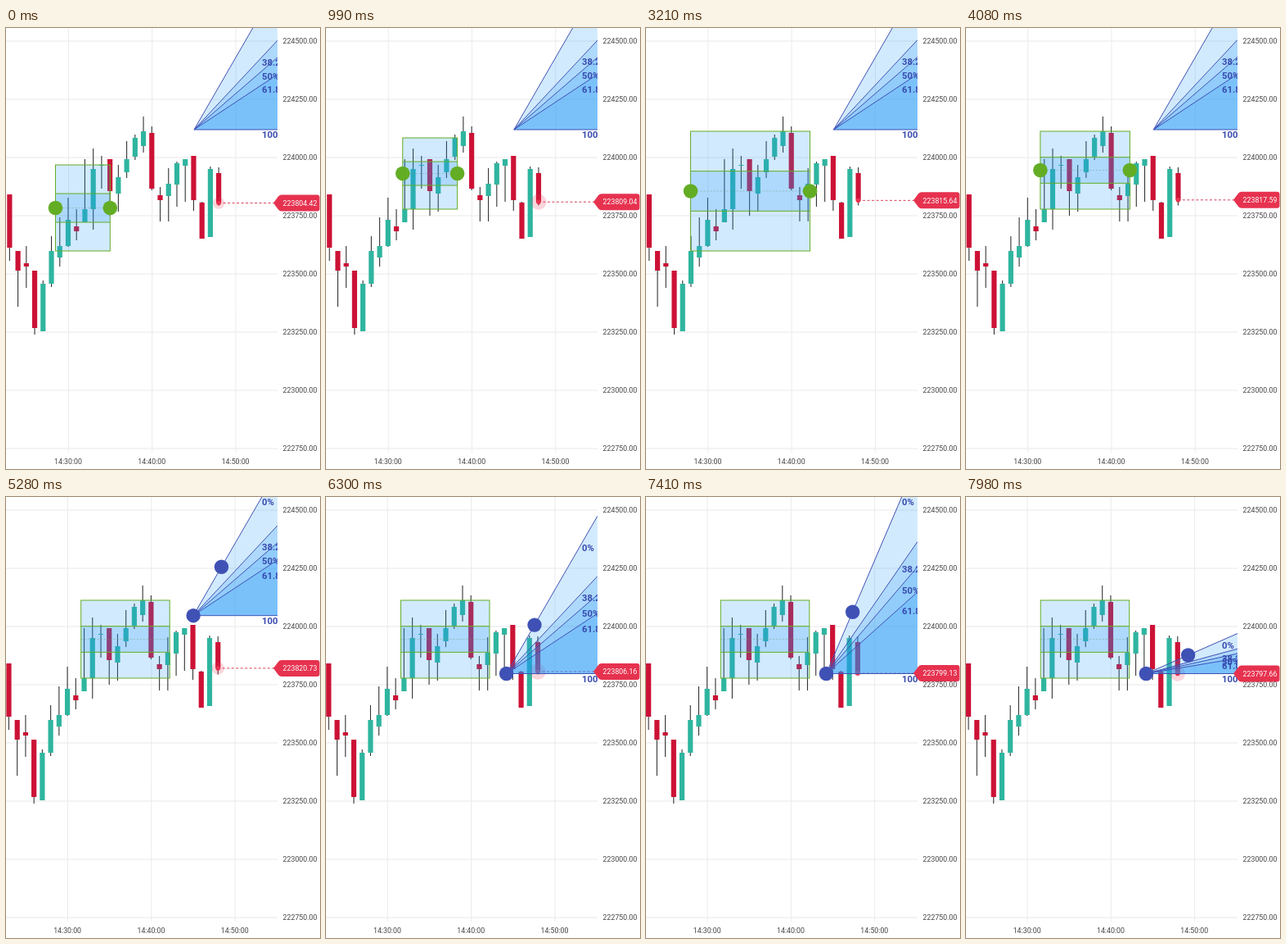
These frames come from a looping animation (384 by 538 pixels, 8000 ms). An HTML page with a canvas:

```html
<!DOCTYPE html>
<html lang="en">
<head>
<meta charset="utf-8">
<title>Candlestick chart with drawing tools</title>
<style>
  html, body { margin: 0; width: 100%; height: 100%; overflow: hidden; background: #fff; }
  canvas { display: block; width: 384px; height: 538px; }
</style>
</head>
<body>
<canvas id="chart"></canvas>
<script>
const W = 384, H = 538, LOOP = 8000, PLOT = 332;
const MINUTE = 10.23, ORIGIN = 76;
const RED = '#cc1236', GREEN = '#2fb59f', PRICE = '#e6324f', LIME = '#63ad25', INDIGO = '#3f51b5';
const SHADE = 'rgba(33,150,243,.2)';
const canvas = document.getElementById('chart');
const ctx = canvas.getContext('2d');
const dpr = window.devicePixelRatio || 1;
canvas.width = W * dpr;
canvas.height = H * dpr;

// Each candle: open, close, high, low as heights on the stage, one per minute from 14:23.
const FIRST = -7;
const candles = [
  [203, 268, 203, 284], [272, 296, 272, 340], [287, 291, 266, 317], [296, 366, 296, 374],
  [370, 312, 308, 370], [312, 272, 254, 316], [280, 266, 231, 291], [266, 234, 207, 267],
  [242, 248, 221, 259], [237, 221, 160, 237], [221, 172, 147, 246], [168, 167, 156, 196],
  [160, 199, 160, 229], [202, 182, 167, 224], [176, 160, 138, 183], [157, 134, 130, 161],
  [144, 126, 108, 152], [128, 196, 120, 198], [204, 210, 194, 236], [205, 190, 171, 236],
  [191, 165, 163, 218], [168, 160, 160, 212], [156, 210, 156, 223], [213, 257, 212, 257],
  [255, 172, 169, 255]
];
const LIVE = 18;

// Keys are [time, value] pairs, eased from one to the next.
const motion = {
  price: [[0, 223804.42], [1740, 223812.08], [3210, 223815.64], [5280, 223820.73],
          [6300, 223806.16], [7410, 223799.13], [7980, 223797.66]],
  left: [[100, 60.5], [2000, 134.3], [2250, 134.3], [3200, 55.1], [3450, 55.1], [4150, 92.6]],
  right: [[100, 127.3], [2000, 201.1]],
  apexX: [[5350, 230], [6250, 221.7]],
  apexY: [[4850, 124], [6250, 215.5]],
  armX: [[6600, 34.4], [7400, 32.2], [7980, 51.3]],
  armY: [[6600, -59.4], [7400, -75.3], [7980, -22.5]]
};
const smooth = u => u * u * (3 - 2 * u);

function valueAt(keys, t) {
  if (t <= keys[0][0]) return keys[0][1];
  for (let i = 1; i < keys.length; i++) {
    const [t0, a] = keys[i - 1], [t1, b] = keys[i];
    if (t < t1) return a + (b - a) * smooth((t - t0) / (t1 - t0));
  }
  return keys[keys.length - 1][1];
}

const priceY = p => 16 + (224500 - p) * 0.284;
const minuteX = i => ORIGIN + i * MINUTE;

function line(x1, y1, x2, y2, color, width = 1) {
  ctx.strokeStyle = color;
  ctx.lineWidth = width;
  ctx.beginPath();
  ctx.moveTo(x1, y1);
  ctx.lineTo(x2, y2);
  ctx.stroke();
}

function disc(x, y, r, color) {
  ctx.fillStyle = color;
  ctx.beginPath();
  ctx.arc(x, y, r, 0, Math.PI * 2);
  ctx.fill();
}

function text(str, x, y, color, font, align) {
  ctx.fillStyle = color;
  ctx.font = font + ' Roboto, sans-serif';
  ctx.textAlign = align;
  ctx.textBaseline = 'alphabetic';
  ctx.fillText(str, x, y);
}

const axisText = (str, x, y, color = '#444') => text(str, x, y + 3.2, color, '8.8px', 'center');

function drawGrid(drift) {
  for (let i = 0; i < 8; i++) line(0, 16 + i * 71, PLOT, 16 + i * 71, '#e8e8e8');
  for (let i = 0; i < 3; i++) {
    const x = minuteX(i * 10) + drift;
    line(x + 0.4, 0, x + 0.4, 518, '#ebebeb');
  }
}

function drawCandle(i, [open, close, high, low]) {
  const x = minuteX(i);
  line(x, high, x, low, '#333', 1.1);
  ctx.fillStyle = close > open ? RED : GREEN;
  ctx.fillRect(x - 3.1, Math.min(open, close), 6.2, Math.max(1, Math.abs(close - open)));
}

function drawLivePrice(t, y) {
  const x = minuteX(LIVE);
  drawCandle(LIVE, [177, y, 170, 216.5]);
  ctx.setLineDash([3, 2.5]);
  line(x, y, PLOT + 4, y, '#d63f5a');
  ctx.setLineDash([]);
  const phase = (t / 877 + 0.83) % 1;
  disc(x, y, 9.8 * smooth(Math.abs(1 - 2 * phase)), 'rgba(230,50,79,.2)');
  disc(x, y, 2.8, PRICE);
}

// The range box spans the highest and lowest close of the minutes it covers.
function drawRange(t) {
  const left = valueAt(motion.left, t), right = valueAt(motion.right, t);
  const index = x => Math.round((x - ORIGIN) / MINUTE) - FIRST;
  const closes = candles.slice(index(left), index(right) + 1).map(c => c[1]);
  const top = Math.min(...closes), bottom = Math.max(...closes);
  const third = (bottom - top) / 3, middle = (top + bottom) / 2;
  ctx.fillStyle = SHADE;
  ctx.fillRect(left, top, right - left, bottom - top);
  ctx.fillRect(left, top + third, right - left, third);
  ctx.strokeStyle = LIME;
  ctx.lineWidth = 1;
  ctx.strokeRect(left, top, right - left, bottom - top);
  line(left, top + third, right, top + third, LIME);
  line(left, bottom - third, right, bottom - third, LIME);
  ctx.setLineDash([2, 2]);
  line(left, middle, right, middle, 'rgba(99,150,110,.5)', 0.8);
  ctx.setLineDash([]);
  if (t < 4350) [left, right].forEach(x => disc(x, middle, 8.8, LIME));
}

function drawFan(t, drift) {
  const x = valueAt(motion.apexX, t), y = valueAt(motion.apexY, t);
  const armX = valueAt(motion.armX, t), armY = valueAt(motion.armY, t);
  const edge = PLOT - drift, labelX = 313 - drift;
  const levels = [0, 38.2, 50, 61.8, 100].map(level => ({
    level, slope: armY / armX * (1 - level / 100)
  }));
  for (const { slope } of levels) {
    ctx.fillStyle = SHADE;
    ctx.beginPath();
    ctx.moveTo(x, y);
    ctx.lineTo(edge, y + slope * (edge - x));
    ctx.lineTo(edge, y);
    ctx.fill();
  }
  for (const { level, slope } of levels) {
    line(x, y, edge, y + slope * (edge - x), INDIGO);
    text(level + '%', labelX, y + slope * (labelX - x) + 10.2, '#374bae', '700 11.3px', 'left');
  }
  if (t >= 4500) {
    disc(x, y, 8.7, INDIGO);
    disc(x + armX, y + armY, 8.7, INDIGO);
  }
}

function drawPriceTag(price, y) {
  ctx.fillStyle = PRICE;
  ctx.beginPath();
  ctx.moveTo(327, y);
  ctx.lineTo(333, y - 8);
  ctx.quadraticCurveTo(334.5, y - 10, 337, y - 10);
  ctx.arcTo(383.5, y - 10, 383.5, y, 3);
  ctx.arcTo(383.5, y + 10, 337, y + 10, 3);
  ctx.lineTo(337, y + 10);
  ctx.quadraticCurveTo(334.5, y + 10, 333, y + 8);
  ctx.fill();
  axisText(price.toFixed(2), 359.5, y, '#fff');
}

function draw(t) {
  const drift = -t / 60000 * MINUTE;
  const price = valueAt(motion.price, t), y = priceY(price);
  ctx.setTransform(dpr, 0, 0, dpr, 0, 0);
  ctx.fillStyle = '#fff';
  ctx.fillRect(0, 0, W, H);
  drawGrid(drift);

  ctx.save();
  ctx.beginPath();
  ctx.rect(0, 0, PLOT, H);
  ctx.clip();
  ctx.translate(drift, 0);
  candles.forEach((candle, i) => drawCandle(FIRST + i, candle));
  drawLivePrice(t, y);
  drawRange(t);
  drawFan(t, drift);
  ctx.restore();

  for (let i = 0; i < 8; i++) axisText((224500 - i * 250).toFixed(2), 359.5, 16 + i * 71);
  for (let i = 0; i < 3; i++) axisText(`14:${30 + i * 10}:00`, minuteX(i * 10) + drift, 529);
  drawPriceTag(price, y);
}

const start = performance.now();
function frame() {
  draw((performance.now() - start) % LOOP);
  requestAnimationFrame(frame);
}
frame();
</script>
</body>
</html>
```
